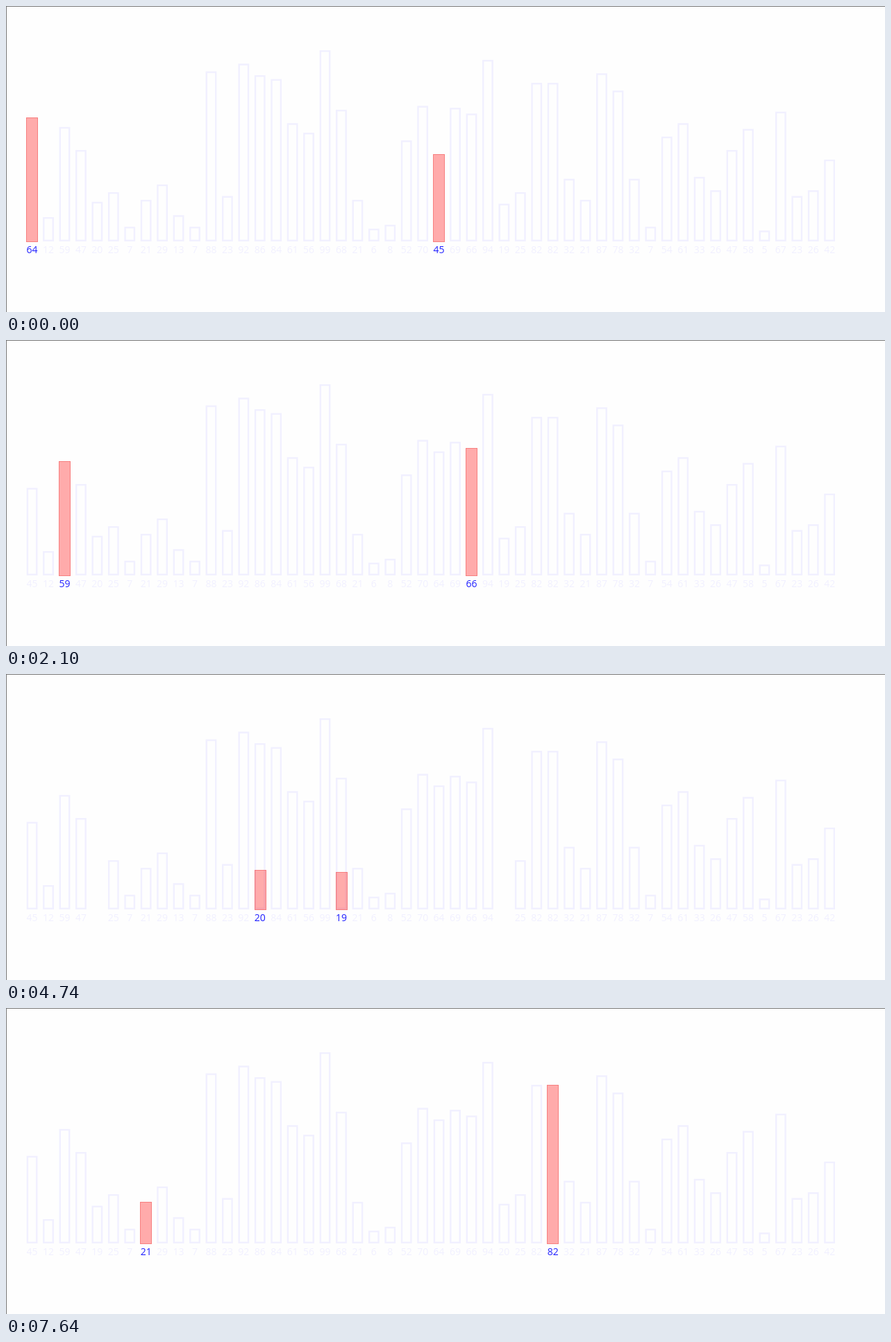
Animation of 1266x442 px, one loop 8 s. Source, as an HTML page with a canvas:

```html
<!DOCTYPE html>
<html lang="en">
<head>
<meta charset="utf-8">
<title>Shell sort, gap 25</title>
<style>
  html, body { margin: 0; width: 100%; height: 100%; overflow: hidden; background: #fefefe; }
  canvas { display: block; }
</style>
</head>
<body>
<canvas id="stage" width="1266" height="442"></canvas>
<script>
const ctx = document.getElementById('stage').getContext('2d');
const LOOP = 8000, GAP = 25, BASE = 339.4, UNIT = 2.77;
const DIM = '#f1f0ff', BLUE = '#2222ff';

const start = [
  64, 12, 59, 47, 20, 25, 7, 21, 29, 13, 7, 88, 23, 92, 86, 84, 61,
  56, 99, 68, 21, 6, 8, 52, 70, 45, 69, 66, 94, 19, 25, 82, 82, 32,
  21, 87, 78, 32, 7, 54, 61, 33, 26, 47, 58, 5, 67, 23, 26, 42
];

// Pair n compares bars n and n + GAP: selected first, then filled red.
const selectAt = [0, 580, 1700, 2630, 3560, 5160, 6060, 7020];
const fillAt = [0, 1140, 2100, 3190, 4150, 5530, 6590, 7640];

// A swap takes 450 ms and is redrawn only at the listed times.
const SWAP_MS = 450;
const swaps = {
  0: { begin: 70, ticks: [160, 310, 430] },
  4: { begin: 4560, ticks: [4590, 4740, 4890, 5010] }
};

const lastUpTo = (times, t) => times.findLastIndex(time => time <= t);
const centre = slot => 37.6 + slot * 23.44;

function label(value, x, color) {
  ctx.fillStyle = color;
  ctx.fillText(value, x, 357);
}

function outlineBar(value, x, color) {
  ctx.strokeStyle = color;
  ctx.lineWidth = 2.4;
  ctx.strokeRect(x - 6.7, BASE - UNIT * value, 13.4, UNIT * value - 0.6);
  label(value, x, color);
}

function redBar(value, x) {
  const left = Math.round(x - 8.2), top = Math.round(BASE - UNIT * value - 1);
  ctx.fillStyle = 'rgba(255, 0, 0, 0.33)';
  ctx.fillRect(left, top, 17, 341 - top);
  ctx.strokeStyle = 'rgba(235, 60, 60, 0.4)';
  ctx.lineWidth = 1;
  ctx.strokeRect(left + 0.5, top + 0.5, 16, 340 - top);
  label(value, x, BLUE);
}

function swapProgress(swap, t) {
  const i = swap ? lastUpTo(swap.ticks, t) : -1;
  return i < 0 ? 0 : (swap.ticks[i] - swap.begin) / SWAP_MS;
}

function draw(t) {
  const pair = lastUpTo(selectAt, t), other = pair + GAP;
  const values = start.slice();
  for (const key of Object.keys(swaps)) {
    const i = +key;
    if (i < pair) [values[i], values[i + GAP]] = [values[i + GAP], values[i]];
  }

  ctx.fillStyle = '#fefefe';
  ctx.fillRect(0, 0, 1266, 442);
  ctx.fillStyle = '#777';
  ctx.fillRect(0, 0, 1266, 1);
  ctx.fillRect(0, 0, 1, 442);

  ctx.font = '14px "Open Sans", "Noto Sans", sans-serif';
  ctx.textAlign = 'center';
  values.forEach((value, i) => {
    if (i !== pair && i !== other) outlineBar(value, centre(i), DIM);
  });

  const shift = GAP * swapProgress(swaps[pair], t);
  const bar = t < fillAt[pair] ? (v, x) => outlineBar(v, x, BLUE) : redBar;
  bar(values[pair], centre(pair + shift));
  bar(values[other], centre(other - shift));
}

const origin = performance.now();
function tick() {
  draw((performance.now() - origin) % LOOP);
  requestAnimationFrame(tick);
}
tick();
</script>
</body>
</html>
```
